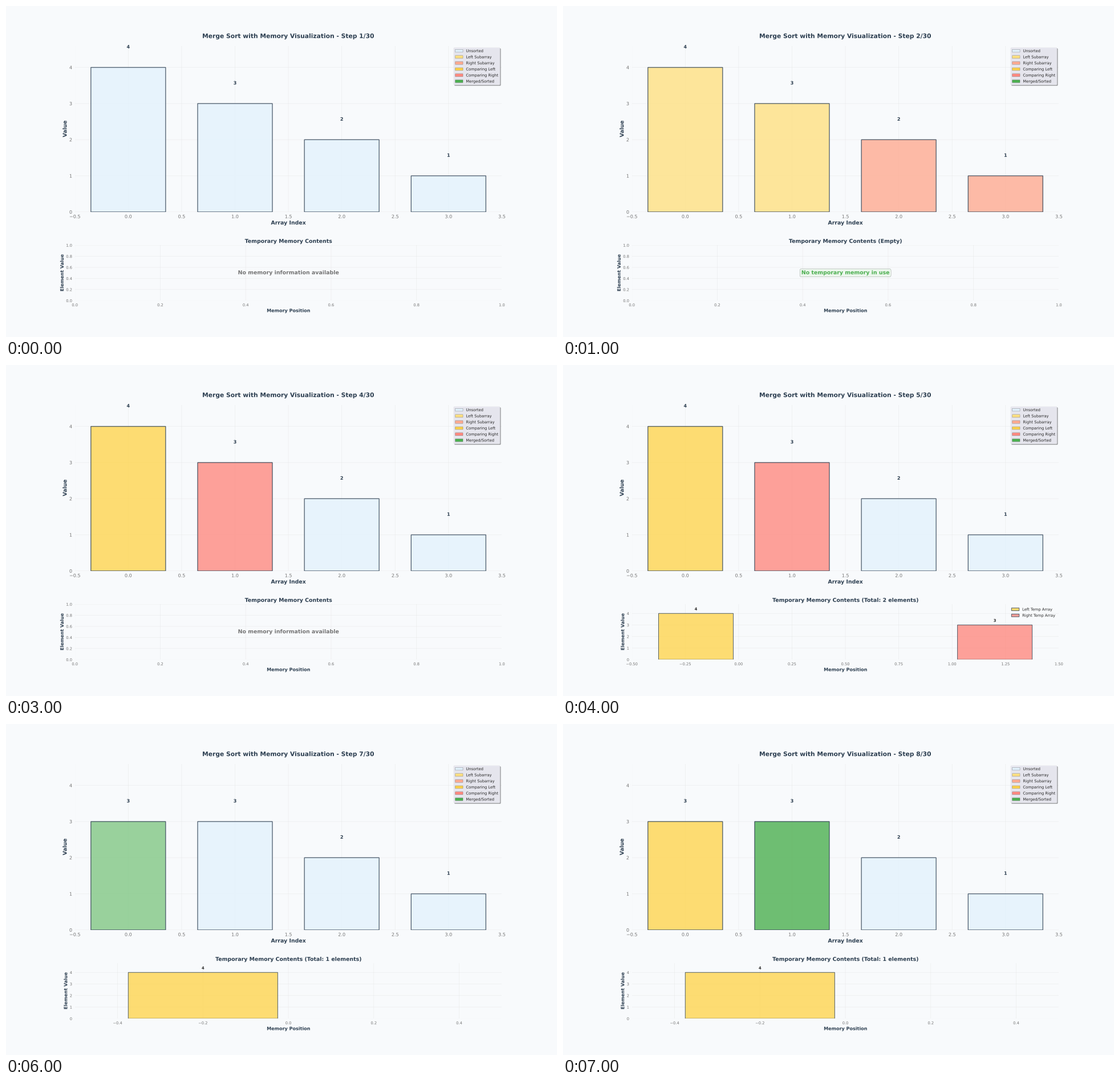
Animation of 966 by 580 pixels, one loop 8 s. Source, as a matplotlib script:

```python
import matplotlib.pyplot as plt
from matplotlib.animation import FuncAnimation
from matplotlib.patches import Patch
from matplotlib.patheffects import Normal

DPI = 48.3
BG = "#F8FAFC"
INK = "#2C3E50"
GRAY = "#757575"

plt.rcParams.update({
    "font.family": "DejaVu Sans",
    # Unhinted outlines keep small text and thin edges at subpixel places.
    "text.hinting": "none",
    "path.effects": [Normal()],
    "path.snap": False,
    "text.color": "0.15",
    "axes.facecolor": BG,
    "axes.axisbelow": True,
    "axes.linewidth": 0,
    "axes.labelcolor": INK,
    "axes.labelweight": "bold",
    "axes.titleweight": "bold",
    "axes.titlecolor": INK,
    "axes.grid": True,
    "grid.color": "#E0E0E0",
    "grid.alpha": 0.5,
    "grid.linewidth": 1,
    "patch.linewidth": 0.3,
    "xtick.major.size": 0,
    "ytick.major.size": 0,
    "xtick.major.pad": 7,
    "ytick.major.pad": 7,
    "legend.fontsize": 10,
    "legend.labelspacing": 0.58,
    "legend.frameon": False,
})

UNSORTED, LEFT, RIGHT = "#E3F2FD", "#FFE082", "#FFAB91"
CMP_LEFT, CMP_RIGHT = "#FFD54F", "#FF8A80"
MERGED, PLACED = "#4CAF50", "#81C784"

LEGEND = [
    ("Unsorted", UNSORTED),
    ("Left Subarray", LEFT),
    ("Right Subarray", RIGHT),
    ("Comparing Left", CMP_LEFT),
    ("Comparing Right", CMP_RIGHT),
    ("Merged/Sorted", MERGED),
]

START = [4, 3, 2, 1]
WRITTEN = [3, 3, 2, 1]

# Each step: values, colours of the first bars, temporary memory (left, right).
# Memory None means unknown; two empty lists mean nothing is stored.
STEPS = [
    (START, [], None),
    (START, [LEFT, LEFT, RIGHT, RIGHT], ([], [])),
    (START, [LEFT, RIGHT], ([], [])),
    (START, [CMP_LEFT, CMP_RIGHT], None),
    (START, [CMP_LEFT, CMP_RIGHT], ([4], [3])),
    (START, [MERGED, CMP_RIGHT], ([4], [3])),
    (WRITTEN, [PLACED], ([4], [])),
    (WRITTEN, [CMP_LEFT, MERGED], ([4], [])),
]
TOTAL_STEPS = 30

fig, (top, mem) = plt.subplots(
    2, 1, figsize=(20, 580 / DPI), dpi=DPI, facecolor=BG,
    gridspec_kw={"height_ratios": [3, 1], "hspace": 0.3})
fig.subplots_adjust(left=0.125, right=0.9, bottom=0.11, top=0.88)


def draw_bars(ax, xs, values, colors, width, edge, gap, **label_style):
    bars = ax.bar(xs, values, width, color=colors, edgecolor=INK,
                  linewidth=edge, alpha=0.8)
    for x, v in zip(xs, values):
        ax.text(x, v + gap, str(v), ha="center", va="bottom",
                fontweight="bold", **label_style)
    return bars


def draw_array(step, values, colors):
    colors = colors + [UNSORTED] * (len(values) - len(colors))
    draw_bars(top, range(len(values)), values, colors, 0.7, 2, 0.5,
              fontsize=12, color=INK)
    top.set_xlim(-0.5, len(values) - 0.5)
    top.set_ylim(0, max(START) * 1.15)
    top.set_title(
        f"Merge Sort with Memory Visualization - Step {step}/{TOTAL_STEPS}",
        fontsize=16, pad=20)
    top.set_xlabel("Array Index", fontsize=14)
    top.set_ylabel("Value", fontsize=14)
    top.tick_params(labelsize=12, labelcolor=GRAY)
    handles = [Patch(facecolor=c, edgecolor="black", label=name)
               for name, c in LEGEND]
    top.legend(handles=handles, loc="upper right", frameon=True, shadow=True,
               facecolor="#EAEAF2", edgecolor="0.8", framealpha=0.95)


def draw_note(text, color, box=None):
    mem.text(0.5, 0.5, text, transform=mem.transAxes, ha="center",
             va="center", fontsize=14, fontweight="bold", color=color,
             bbox=box)


def draw_memory(memory):
    title = "Temporary Memory Contents"
    if memory is None:
        draw_note("No memory information available", GRAY)
    elif not any(memory):
        title += " (Empty)"
        draw_note("No temporary memory in use", MERGED,
                  dict(boxstyle="round,pad=0.3", facecolor="#E8F5E9",
                       edgecolor="black", alpha=0.8))
    else:
        left, right = memory
        count = len(left) + len(right)
        title += f" (Total: {count} elements)"
        groups = []
        for values, first, shift, color in (
                (left, 0, -0.2, CMP_LEFT),
                (right, len(left), 0.2, CMP_RIGHT)):
            if values:
                xs = [first + i + shift for i in range(len(values))]
                groups.append(draw_bars(mem, xs, values, color, 0.35, 1.5,
                                        0.2, fontsize=10))
        if len(groups) == 2:
            mem.legend(groups, ["Left Temp Array", "Right Temp Array"],
                       loc="upper right")
        mem.set_xlim(-0.5, count - 0.5)
        mem.set_ylim(0, max(left + right) * 1.2)
    mem.set_title(title, fontsize=14)
    mem.set_xlabel("Memory Position", fontsize=12)
    mem.set_ylabel("Element Value", fontsize=12)
    mem.tick_params(labelsize=10, labelcolor=GRAY)


def update(i):
    top.clear()
    mem.clear()
    values, colors, memory = STEPS[i]
    draw_array(i + 1, values, colors)
    draw_memory(memory)
    return []


anim = FuncAnimation(fig, update, frames=len(STEPS), interval=1000,
                     init_func=lambda: [], repeat=True, repeat_delay=0)
plt.show()
```
